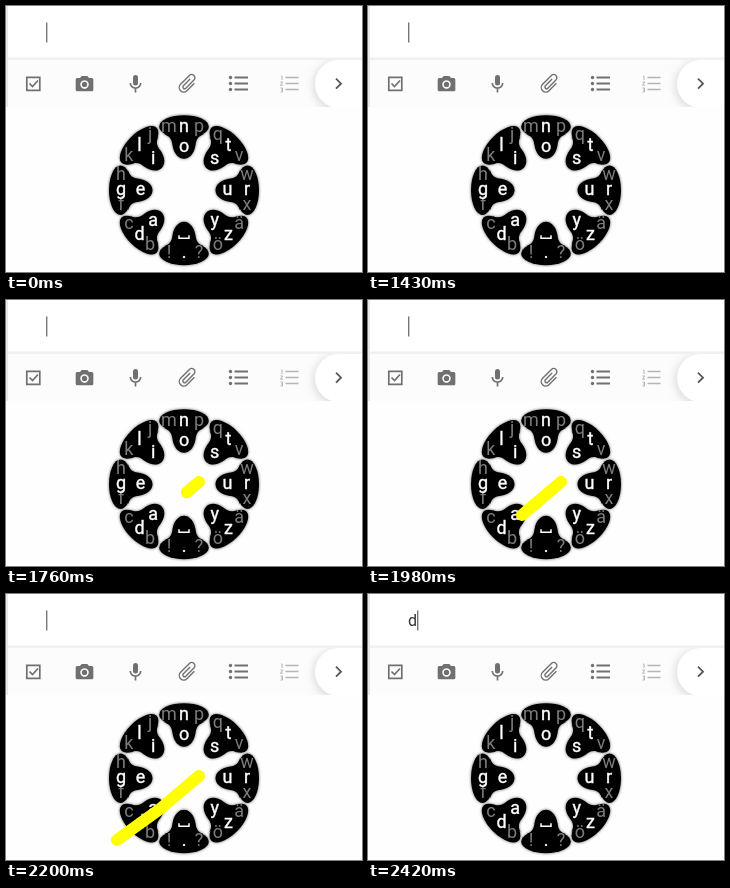
Animation of 356x266 px, one loop 3630 ms. Source, as an HTML page:

```html
<!DOCTYPE html>
<html lang="en">
<head>
<meta charset="utf-8">
<title>Swipe keyboard</title>
<style>
  html, body { margin: 0; width: 100%; height: 100%; overflow: hidden; background: #fefefe; }
  svg { display: block; width: 100vw; height: 100vh; font-family: Roboto, Arial, sans-serif; }
  .icon { fill: none; stroke: #707070; stroke-width: 1.7; filter: blur(.4px); }
  .solid { fill: #707070; stroke: none; }
  .petal { filter: blur(.6px) drop-shadow(0 0 1.6px #666); }
  .keys { font-size: 18px; text-anchor: middle; fill: #fff; filter: blur(.4px); }
  .keys .dim { fill: #7c7c7c; }
  .keys .lit { stroke: #fff; stroke-width: .4; }

  .swipe, .typed, .caret { animation: 3630ms step-end infinite; }
  .swipe {
    fill: none; stroke: #ff0; stroke-width: 12;
    stroke-linecap: round; stroke-linejoin: round;
    stroke-dasharray: 104 210; visibility: hidden;
    animation-name: swipe;
  }
  .typed { visibility: hidden; animation-name: type; }
  .caret { animation-name: caret; }

  @keyframes swipe {
    0%     { visibility: hidden; stroke-dashoffset: 103.9; }
    45.45% { visibility: visible; stroke-dashoffset: 103; }
    48.48% { visibility: visible; stroke-dashoffset: 88; }
    51.51% { visibility: visible; stroke-dashoffset: 72; }
    54.54% { visibility: visible; stroke-dashoffset: 53; }
    57.57% { visibility: visible; stroke-dashoffset: 27; }
    60.6%  { visibility: visible; stroke-dashoffset: 0; }
    66.66%, 100% { visibility: hidden; stroke-dashoffset: 0; }
  }
  @keyframes type {
    0% { visibility: hidden; }
    66.66%, 100% { visibility: visible; }
  }
  @keyframes caret {
    0% { transform: none; }
    66.66%, 100% { transform: translateX(9px); }
  }
</style>
</head>
<body>
<svg viewBox="0 0 356 266">
  <defs>
    <clipPath id="bar"><rect y="54" width="356" height="47"/></clipPath>
    <filter id="soft" x="-50%" y="-50%" width="200%" height="200%"><feGaussianBlur stdDeviation="4"/></filter>
    <g id="petal">
      <ellipse cy="-63.5" rx="24.8" ry="11.5"/>
      <path d="M-20 -56C-13 -54 -12 -49 -11.5 -45C-10 -36 -5 -31.5 0 -31.5C5 -31.5 10 -36 11.5 -45C12 -49 13 -54 20 -56Z"/>
    </g>
  </defs>

  <rect width="356" height="101" fill="#fff"/>
  <rect y="54" width="356" height="47" fill="#fcfcfc"/>
  <rect y="51.5" width="356" height="2.5" fill="#f0f0f0"/>
  <rect width="2" height="101" fill="#e9e9e9"/>

  <text class="typed" x="40" y="31.5" font-size="16" fill="#333">d</text>
  <rect class="caret" x="40" y="16.5" width="1.4" height="20" fill="#777"/>

  <g class="icon">
    <path d="M20.8 71.3h13v13h-13zM23.5 77.5l3 3 5.5-6"/>
    <g transform="translate(78.5 78) scale(.94)">
      <path class="solid" fill-rule="evenodd" d="M-3-8.500h6l1.800 2h3a1.600 1.600 0 0 1 1.600 1.600v11a1.600 1.600 0 0 1-1.600 1.600h-15.600a1.600 1.600 0 0 1-1.600-1.600v-11a1.600 1.600 0 0 1 1.600-1.600h3zM0-4a4.500 4.500 0 1 0 .01 0z"/>
      <circle class="solid" cy=".5" r="2.8"/>
    </g>
    <rect class="solid" x="127" y="69" width="5" height="10.5" rx="2.5"/>
    <path d="M124.300 77a5.200 5.200 0 0 0 10.400 0M129.500 82.500v4"/>
    <path transform="translate(181.5 77.500) rotate(45)" stroke-width="1.4"
      d="M4.700 -5V5.500a4.500 4.500 0 0 1-9 0V-7a3.200 3.200 0 0 1 6.400 0V4.500a1.700 1.700 0 0 1-3.400 0V-5"/>
    <path stroke-width="2" d="M228.500 71.500h13.500M228.500 77.500h13.500M228.500 83.500h13.500"/>
    <g class="solid">
      <circle cx="224.5" cy="71.5" r="1.7"/><circle cx="224.5" cy="77.5" r="1.7"/><circle cx="224.5" cy="83.5" r="1.7"/>
    </g>
    <path stroke="#b4b4b4" d="M279.500 71.500h13M279.500 77.500h13M279.500 83.500h13"/>
    <path stroke="#b4b4b4" stroke-width="1" d="M275 70h1v4M274.500 76h2.300l-2.300 3.200h2.500M274.500 82h2v4h-2M275 84h1.500"/>
  </g>

  <g clip-path="url(#bar)">
    <circle cx="332" cy="80" r="25" fill="#bbb" opacity=".5" filter="url(#soft)"/>
    <circle cx="333" cy="78" r="24" fill="#fff"/>
    <rect x="333" y="54" width="23" height="47" fill="#fff"/>
  </g>
  <path d="M330 72.700l5 5-5 5" fill="none" stroke="#555" stroke-width="1.8"/>

  <g id="wheel" transform="translate(178 184.2)"></g>
  <path class="swipe" pathLength="104" d="M193 182L154 215L111 246"/>
</svg>
<script>
  // Each group: three rim keys in clockwise order, then the inner key.
  const groups = ["mnpo", "qtvs", "wrxu", "äzöy", "?.! ", "bdca", "fghe", "klji"];
  const wheel = document.getElementById("wheel");

  function add(parent, tag, attrs, text = "") {
    const node = document.createElementNS("http://www.w3.org/2000/svg", tag);
    for (const name in attrs) node.setAttribute(name, attrs[name]);
    node.textContent = text;
    parent.append(node);
    return node;
  }

  groups.forEach((_, i) => {
    const petal = add(wheel, "g", { class: "petal" });
    add(petal, "use", { href: "#petal", transform: `rotate(${i * 45})` });
  });

  const keys = add(wheel, "g", { class: "keys" });
  groups.forEach((letters, i) => {
    const angle = i * Math.PI / 4;
    const sin = Math.sin(angle), cos = Math.cos(angle);
    const key = (letter, radius, side) => add(keys, "text", {
      x: radius * sin + side * cos,
      y: side * sin - radius * cos + 5,
      class: side ? "dim" : "lit"
    }, letter);
    key(letters[0], 63, -15);
    key(letters[2], 63, 15);
    key(letters[1], 63, 0);
    if (letters[3] !== " ") key(letters[3], 43.5, 0);
  });
  add(keys, "path", { d: "M-5 45v3h10v-3", fill: "none", stroke: "#fff", "stroke-width": 1.5 });
</script>
</body>
</html>
```
